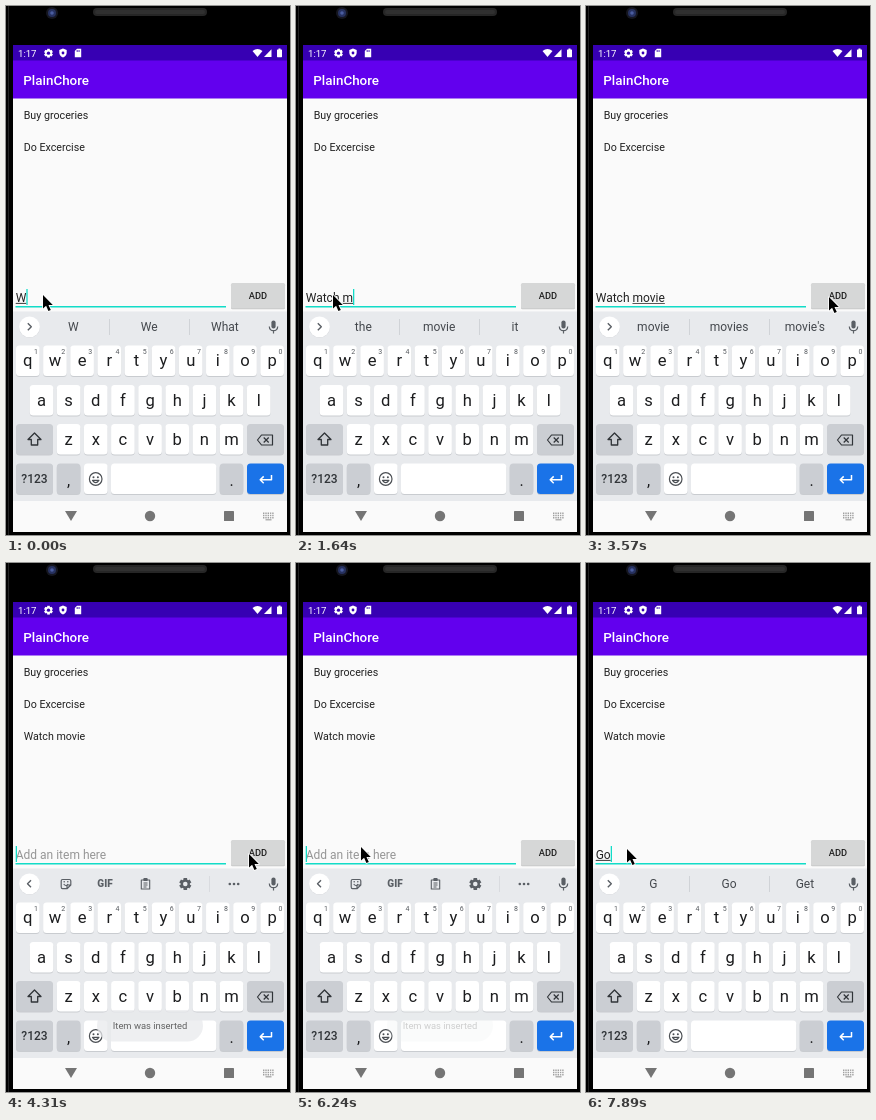
Write an HTML page with a canvas that moves like this. It is 284 by 529 pixels and loops after 8 s.

```html
<!DOCTYPE html>
<html lang="en">
<head>
<meta charset="utf-8">
<title>To-do list</title>
<style>
  html, body { margin: 0; width: 100%; height: 100%; overflow: hidden; background: #000; }
  canvas { display: block; width: 284px; height: 529px; }
</style>
</head>
<body>
<canvas id="stage"></canvas>
<script>
const W = 284, H = 529, LOOP = 8000;
const canvas = document.getElementById('stage');
const c = canvas.getContext('2d');
const ratio = window.devicePixelRatio || 1;
canvas.width = W * ratio;
canvas.height = H * ratio;

const TEAL = '#12dcc8', ICON = '#5a5f65', KEY_GRAY = '#cbced3', INK = '#1c1d1f';

// Each entry changes part of the state from its time on.
const timeline = [
  [0, { text: 'W', plain: 0, words: ['W', 'We', 'What'], caret: 1, pointer: [37, 289], items: 2, toast: 0, pressed: 0 }],
  [150, { text: 'Wa' }],
  [300, { words: ['Wa', 'Was', 'Way'] }],
  [600, { text: 'Wat' }],
  [740, { text: 'Watc', words: ['Wat', 'Watch', 'Way'] }],
  [890, { text: 'Watch' }],
  [1040, { words: ['Watch', 'Watched', 'Watching'] }],
  [1190, { text: 'Watch ', plain: 6 }],
  [1340, { words: ['the', 'movie', 'it'] }],
  [1640, { text: 'Watch m' }],
  [1940, { text: 'Watch mo', words: ['m', 'movie', 'my'] }],
  [2080, { text: 'Watch mov', words: ['mo', 'movie', 'movies'] }],
  [2380, { text: 'Watch movi', words: ['mov', 'movie', 'movies'] }],
  [2680, { text: 'Watch movie' }],
  [2830, { words: ['movie', 'movies', "movie's"] }],
  [2980, { pointer: [48, 287] }],
  [3120, { pointer: [110, 282] }],
  [3270, { pointer: [195, 281], caret: 0 }],
  [3420, { pointer: [242, 290] }],
  [3570, { pointer: [243, 291] }],
  [3870, { caret: 1, pressed: 1 }],
  [4010, { text: '', plain: 0, words: null, items: 3 }],
  [4160, { toast: 0.3, pressed: 0 }],
  [4310, { toast: 0.75 }],
  [4450, { toast: 1, caret: 0 }],
  [4600, { pointer: [160, 287] }],
  [4740, { pointer: [65, 284] }],
  [4890, { caret: 1 }],
  [5340, { caret: 0 }],
  [5940, { caret: 1, toast: 0.85 }],
  [6090, { toast: 0.55 }],
  [6240, { toast: 0.22 }],
  [6390, { toast: 0, caret: 0 }],
  [6690, { pointer: [56, 293] }],
  [6840, { pointer: [45, 290] }],
  [6990, { pointer: [41, 286], caret: 1 }],
  [7440, { text: 'G' }],
  [7590, { words: ['G', 'Go', 'Get'] }],
  [7890, { text: 'Go' }]
];

function stateAt(time) {
  return Object.assign({}, ...timeline.filter(e => e[0] <= time).map(e => e[1]));
}

function rect(x, y, w, h, color, r = 0) {
  c.fillStyle = color;
  c.beginPath();
  c.roundRect(x, y, w, h, r);
  c.fill();
}

function circle(x, y, r, color) {
  c.fillStyle = color;
  c.beginPath();
  c.arc(x, y, r, 0, Math.PI * 2);
  c.fill();
}

function label(text, x, y, size, color, align = 'left', weight = 400) {
  c.font = `${weight} ${size}px Roboto, sans-serif`;
  c.textAlign = align;
  c.fillStyle = color;
  c.fillText(text, x, y);
}

// Draws SVG path data with its origin at (x, y).
function shape(x, y, data, { fill, stroke, width = 1.2 }) {
  const path = new Path2D(data);
  c.save();
  c.translate(x, y);
  c.lineWidth = width;
  c.lineJoin = 'round';
  if (stroke) { c.strokeStyle = stroke; c.stroke(path); }
  if (fill) { c.fillStyle = fill; c.fill(path); }
  c.restore();
}

function gear(x, y, r, color, hole) {
  c.save();
  c.translate(x, y);
  for (let i = 0; i < 6; i++) {
    rect(-r * 0.3, -r, r * 0.6, r, color);
    c.rotate(Math.PI / 3);
  }
  circle(0, 0, r * 0.78, color);
  circle(0, 0, r * 0.38, hole);
  c.restore();
}

function drawPhone() {
  rect(0, 0, W, H, '#000');
  rect(2, 0, 1, H, '#222');
  circle(46, 7, 6, '#15161f');
  circle(46, 7, 4, '#26315f');
  circle(46, 7, 1.8, '#4a5da0');
  rect(87, 2, 114, 8, '#262626', 4);
  rect(89, 4, 110, 4, '#303030', 2);
  rect(7, 39, 274, 487, '#fafafa');
}

function drawHeader() {
  const white = '#fff', purple = '#3700b3';
  rect(7, 39, 274, 16, purple);
  rect(7, 54.5, 274, 38, '#6200ee');
  label('1:17', 12, 51, 9.6, white);
  gear(42.5, 47.2, 4.4, white, purple);
  shape(57, 47, 'M0-4.5L3.7-3V0Q3.3 3.3 0 4.6Q-3.3 3.3-3.7 0V-3Z', { fill: white });
  circle(57, 47, 1.4, purple);
  shape(72, 47, 'M-1-4.3H3.2V4.3H-3.2V-2Z', { fill: white });
  rect(70.7, 44, 0.9, 2, purple);
  rect(72.6, 44, 0.9, 2, purple);
  shape(251.5, 51, 'M0 0L-5-6Q0-10 5-6Z', { fill: white });
  shape(258, 51, 'M0 0H7.5V-7.8Z', { fill: white });
  rect(271, 43.5, 5, 7.7, white, 0.6);
  rect(272.5, 42.5, 2, 1.5, white);
  label('PlainChore', 17.3, 79, 13.4, white, 'left', 500);
}

function drawList(count) {
  ['Buy groceries', 'Do Excercise', 'Watch movie'].slice(0, count)
    .forEach((item, i) => label(item, 17.7, 112.5 + i * 32, 10.7, '#212121'));
}

function drawInput({ text, plain, caret, pressed }) {
  label(text || 'Add an item here', 9.7, 295.5, 12, text ? '#222' : '#969696');
  const start = 9.7 + c.measureText(text.slice(0, plain)).width;
  const end = 9.7 + c.measureText(text).width;
  if (end > start) rect(start, 296.9, end - start, 0.9, '#222');
  if (caret) rect(end, 283, 1.3, 16, TEAL);
  rect(9.5, 300, 210.5, 1.5, TEAL);
  rect(225, 277.8, 54, 25.5, '#c4c4c4', 1.5);
  rect(225, 277, 54, 25.5, pressed ? '#c6c7c7' : '#d6d7d7', 1.5);
  label('ADD', 252, 293.2, 9.3, '#202020', 'center', 500);
}

function drawStrip(words) {
  circle(23.5, 321.4, 10.5, '#d8dade');
  circle(23.5, 320.8, 10.4, '#fff');
  shape(23.5, 320.8, words ? 'M-1.7-3.5L1.8 0L-1.7 3.5' : 'M1.5-3.5L-2 0L1.5 3.5', { stroke: ICON, width: 1.4 });
  if (words) {
    words.forEach((word, i) => label(word, 67.3 + i * 75.8, 325.4, 12, '#44484d', 'center'));
    rect(103, 313, 1, 16, '#d0d3d7');
    rect(183, 313, 1, 16, '#d0d3d7');
  } else {
    shape(60, 321, 'M-3.5-4.5H3.5Q4.8-4.5 4.8-3V1L1 4.7H-3.5Q-4.8 4.7-4.8 3V-3Q-4.8-4.5-3.5-4.5ZM4.8 1H1V4.7M-2.3 0Q0 3 2 0', { stroke: ICON });
    circle(-1.8 + 60, 318.8, 0.8, ICON);
    circle(1.8 + 60, 318.8, 0.8, ICON);
    label('GIF', 99, 324.4, 10, ICON, 'center', 900);
    shape(139.5, 321, 'M-4.2-4H4.2V5H-4.2ZM-2-1H2M-2 1H2M-2 3H1', { stroke: ICON, width: 1.1 });
    rect(137.3, 315, 4.4, 3, ICON, 1);
    gear(179.3, 321, 6, ICON, '#e8eaed');
    rect(203, 313, 1, 16, '#d9dbdf');
    [-4.2, 0, 4.2].forEach(dx => circle(228 + dx, 321, 1.3, ICON));
  }
  rect(265.4, 314.5, 4.2, 8, ICON, 2.1);
  shape(267.5, 320.5, 'M-4.2 0Q-4 4.2 0 4.2Q4 4.2 4.2 0M0 4V7', { stroke: ICON });
}

function key(x, y, width, color = '#fff') {
  rect(x, y + 1, width, 30.5, '#c9ccd0', 3.5);
  rect(x, y, width, 30.5, color, 3.5);
}

function letterRow(letters, x, y, digits) {
  [...letters].forEach((letter, i) => {
    const left = x + i * 27.15;
    key(left, y, 23.6);
    label(letter, left + 11.8, y + 20.8, 16.6, INK, 'center');
    if (digits) label((i + 1) % 10, left + 20, y + 8, 7, '#55595e', 'center');
  });
}

function drawKeyboard(words) {
  rect(7, 305.5, 274, 190, '#e8eaed');
  drawStrip(words);
  letterRow('qwertyuiop', 10, 339.5, true);
  letterRow('asdfghjkl', 23.7, 379, false);
  letterRow('zxcvbnm', 50.8, 418, false);

  key(10, 418, 37, KEY_GRAY);
  shape(28.5, 433.5, 'M0-6.5L6.5 0H3.2V5.5H-3.2V0H-6.5Z', { stroke: '#303438', width: 1.3 });
  key(241, 418, 37, KEY_GRAY);
  shape(259.5, 434, 'M-8 0L-4-5H7V5H-4ZM-1.8-2.5L3.2 2.5M3.2-2.5L-1.8 2.5', { stroke: '#303438', width: 1.2 });

  const y = 457.5;
  key(10, y, 37, KEY_GRAY);
  label('?123', 28.5, y + 19.7, 12, '#303438', 'center', 500);
  key(50.8, y, 23.6, KEY_GRAY);
  label(',', 62.6, y + 22, 16, INK, 'center');
  key(78, y, 23.6);
  shape(89.7, 473, 'M6.3 0A6.3 6.3 0 1 1-6.3 0A6.3 6.3 0 1 1 6.3 0M-3.2 1.3Q0 5.8 3.2 1.3Z', { stroke: '#4a4e53' });
  circle(87.5, 471.2, 1, '#4a4e53');
  circle(91.9, 471.2, 1, '#4a4e53');
  key(105, y, 105.3);
  key(213.7, y, 23.6, KEY_GRAY);
  label('.', 225.5, y + 22, 16, INK, 'center');
  key(241, y, 37, '#1a73e8');
  shape(259.5, 473, 'M6-4V0.8H-5M-1.8-2.6L-5.3 0.8L-1.8 4.2', { stroke: '#fff', width: 1.5 });
}

function drawNavigation() {
  const gray = '#757575';
  rect(7, 495, 274, 31, '#fafafa');
  shape(65, 510, 'M-6-5H6L0 5Z', { fill: gray });
  circle(144, 510, 5.2, gray);
  rect(218, 505, 10, 10, gray, 0.6);
  for (let i = 0; i < 15; i++) {
    rect(257 + (i % 5) * 2.3, 506.5 + Math.floor(i / 5) * 2.3, 1.4, 1.4, '#a0a0a0');
  }
  rect(259.5, 513.2, 6, 1.2, '#a0a0a0');
}

function drawToast(alpha) {
  if (!alpha) return;
  c.globalAlpha = alpha;
  rect(91, 447, 106, 31.5, '#e9eaec', 15.7);
  label('Item was inserted', 144, 465.6, 9.4, '#333', 'center');
  c.globalAlpha = 1;
}

function drawPointer([x, y]) {
  shape(x, y, 'M0 0V13.6L3.1 10.8L5.4 16L7.8 15L5.5 9.9H9.8Z', { fill: '#000', stroke: '#fff', width: 1.6 });
}

function frame(now) {
  const state = stateAt(now % LOOP);
  c.setTransform(ratio, 0, 0, ratio, 0, 0);
  drawPhone();
  drawHeader();
  drawList(state.items);
  drawInput(state);
  drawKeyboard(state.words);
  drawNavigation();
  drawToast(state.toast);
  drawPointer(state.pointer);
  requestAnimationFrame(frame);
}

frame(0);
</script>
</body>
</html>
```
